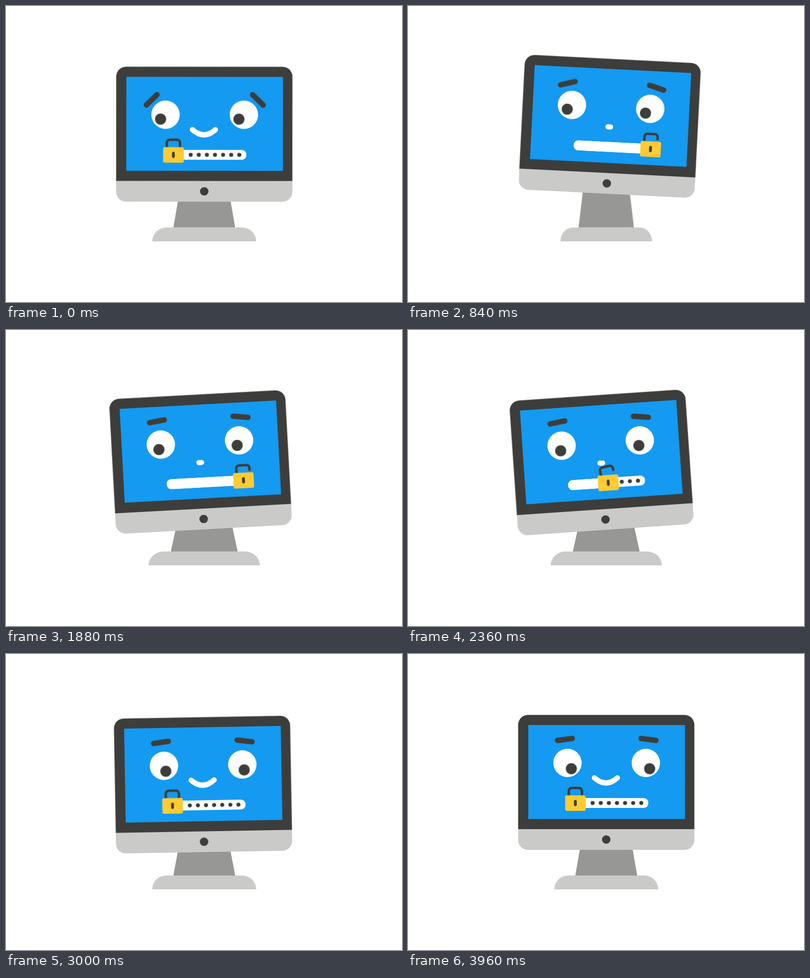
An HTML page that plays this animation: 800 px wide and 600 px high, repeating every 4000 ms.

```html
<!DOCTYPE html>
<html lang="en">
<head>
<meta charset="utf-8">
<title>Worried computer</title>
<style>
  html, body { margin: 0; width: 100%; height: 100%; overflow: hidden; background: #fff; }
  svg { display: block; width: 100vw; height: 100vh; }

  .dark { fill: #3d3d3b; }
  .silver { fill: #cacac9; }
  .blue { fill: #149af0; }
  .white { fill: #fff; }
  .line { fill: none; stroke-linecap: round; }

  .anim { animation: 4s ease-in-out infinite; }
  .head { animation-name: hop; transform-origin: 400.5px 398px; }
  .stand { animation-name: stretch; transform-origin: 400.5px 449px; }
  .base { animation-name: spread; transform-origin: 400.5px 449px; }
  .brow { animation-name: brow; stroke: #3d3d3b; stroke-width: 11; }
  .pupil { animation-name: look; }
  .lid { animation-name: blink; }
  .smile { animation-name: smile; stroke: #fff; stroke-width: 10.5; }
  .slide { animation-name: slide; }
  .swing { animation-name: swing; }
  .shackle { animation-name: unlock; stroke: #3d3d3b; stroke-width: 5; }

  @keyframes hop {
    0% { transform: translateY(0) rotate(0deg); animation-timing-function: ease-out; }
    4% { transform: translateY(-33px) rotate(2.9deg); }
    10% { transform: translateY(-14.5px) rotate(2.9deg); }
    15%, 36% { transform: translateY(-16.5px) rotate(2.9deg); }
    39% { transform: translateY(-29px) rotate(4.1deg); animation-timing-function: ease-in; }
    42% { transform: translateY(-8px) rotate(0deg); animation-timing-function: ease-out; }
    47% { transform: translateY(7px) rotate(-3.08deg); animation-timing-function: ease-out; }
    51%, 64% { transform: translateY(8px) rotate(-3.9deg); }
    67% { transform: translateY(10px) rotate(-4.95deg); animation-timing-function: ease-in; }
    70% { transform: translateY(-23.4px) rotate(1.7deg); animation-timing-function: ease-out; }
    71% { transform: translateY(-33px) rotate(2.9deg); }
    75% { transform: translateY(4.5px) rotate(-1deg); }
    82%, 100% { transform: translateY(0) rotate(0deg); }
  }
  @keyframes stretch {
    0% { transform: scale(1, 1); animation-timing-function: ease-out; }
    4% { transform: scale(.87, 1.635); }
    10% { transform: scale(.895, 1.28); }
    15%, 36% { transform: scale(.895, 1.317); }
    39% { transform: scale(.87, 1.56); animation-timing-function: ease-in; }
    42% { transform: scale(1, 1.15); animation-timing-function: ease-out; }
    47% { transform: scale(1.08, .865); animation-timing-function: ease-out; }
    51%, 64% { transform: scale(1.08, .846); }
    67% { transform: scale(1.09, .81); animation-timing-function: ease-in; }
    70% { transform: scale(.92, 1.45); animation-timing-function: ease-out; }
    71% { transform: scale(.88, 1.635); }
    75% { transform: scale(1, .913); }
    82%, 100% { transform: scale(1, 1); }
  }
  @keyframes spread {
    0% { transform: scaleX(1); animation-timing-function: ease-out; }
    4% { transform: scaleX(.86); }
    10%, 36% { transform: scaleX(.88); }
    39% { transform: scaleX(.86); animation-timing-function: ease-in; }
    42% { transform: scaleX(1); animation-timing-function: ease-out; }
    47%, 64% { transform: scaleX(1.07); }
    67% { transform: scaleX(1.08); animation-timing-function: ease-in; }
    70% { transform: scaleX(.92); animation-timing-function: ease-out; }
    71% { transform: scaleX(.87); }
    75%, 100% { transform: scaleX(1); }
  }
  @keyframes brow {
    0% { transform: translate(293px, 191.5px) rotate(-46.3deg); }
    8%, 30% { transform: translate(317px, 173.2px) rotate(-7.6deg); }
    35%, 37% { transform: translate(317px, 180.4px) rotate(-7.6deg); }
    43%, 66% { transform: translate(317px, 173.2px) rotate(-7.6deg); }
    73%, 100% { transform: translate(292.6px, 184px) rotate(-46.3deg); }
  }
  @keyframes look {
    0%, 4% { transform: translate(-10px, 9px); }
    10% { transform: translate(-2.5px, 10.3px); animation-timing-function: ease-out; }
    16%, 53% { transform: translate(7.8px, 11.8px); animation-timing-function: ease-in; }
    59% { transform: translate(-1.2px, 10.4px); animation-timing-function: ease-out; }
    65%, 100% { transform: translate(-10px, 9px); }
  }
  @keyframes blink {
    0%, 72.5% { transform: translateY(-32px); animation-timing-function: linear; }
    75% { transform: translateY(0); animation-timing-function: ease-out; }
    77.5% { transform: translateY(42px); }
    82%, 100% { transform: translateY(-32px); }
  }
  @keyframes smile {
    0%, 11% { stroke-dasharray: 100 200; stroke-dashoffset: 0; }
    17%, 66% { stroke-dasharray: 10 200; stroke-dashoffset: -45; }
    72%, 100% { stroke-dasharray: 100 200; stroke-dashoffset: 0; }
  }
  @keyframes slide {
    0%, 4% { transform: translateX(0); }
    16%, 53% { transform: translateX(147px); }
    65%, 100% { transform: translateX(0); }
  }
  @keyframes swing {
    0%, 2% { transform: rotate(0deg); }
    6%, 11% { transform: rotate(-10deg); }
    17%, 53% { transform: rotate(0deg); }
    57%, 61% { transform: rotate(-10deg); }
    66%, 100% { transform: rotate(0deg); }
  }
  @keyframes unlock {
    0%, 1% { stroke-dasharray: 57 99; }
    4%, 64% { stroke-dasharray: 48.3 99; }
    67%, 100% { stroke-dasharray: 57 99; }
  }
</style>
</head>
<body>
<svg viewBox="0 0 800 600">
  <defs>
    <clipPath id="eyeClip"><circle r="30"/></clipPath>
    <clipPath id="barClip"><rect x="330" y="292" width="155.5" height="20" rx="9"/></clipPath>
    <g id="eye" clip-path="url(#eyeClip)">
      <circle class="white" r="28.7"/>
      <circle class="anim pupil dark" r="11.2"/>
      <path class="anim lid blue" d="M-31-100V-5Q0-20 31-5V-100Z"/>
    </g>
    <path id="brow" class="anim brow line" d="M-15 0H15"/>
  </defs>

  <path class="anim stand" fill="#979795" d="M338 449L348 391H453L463 449Z"/>
  <path class="anim base silver" d="M295.5 477a28 28 0 0 1 28-28H477.5a28 28 0 0 1 28 28Z"/>

  <g class="anim head">
    <path class="dark" d="M222.5 356V143.5a20 20 0 0 1 20-20H558.5a20 20 0 0 1 20 20V356Z"/>
    <path class="silver" d="M222.5 355V377a20 20 0 0 0 20 20H558.5a20 20 0 0 0 20-20V355Z"/>
    <rect class="blue" x="243" y="144" width="316.5" height="190.5"/>
    <circle class="dark" cx="400.5" cy="376" r="8.6"/>

    <use href="#eye" x="322.2" y="220.7"/>
    <use href="#eye" x="480.5" y="220.7"/>
    <use href="#brow"/>
    <use href="#brow" transform="matrix(-1 0 0 1 803 0)"/>
    <path class="anim smile line" pathLength="100" d="M376.5 251Q400 272 423 251"/>

    <g clip-path="url(#barClip)">
      <rect class="white" x="330" y="292" width="156" height="20"/>
      <path class="line" stroke="#3d3d3b" stroke-width="8.2" stroke-dasharray="0 16.38" d="M373 302H472"/>
      <rect class="anim slide white" x="178" y="292" width="160" height="20"/>
    </g>
    <g class="anim slide">
      <g transform="translate(324.8 287)">
        <g class="anim swing">
          <path class="anim shackle line" d="M0 2V-9.5a6 6 0 0 1 6-6H20.6a6 6 0 0 1 6 6V2"/>
        </g>
      </g>
      <rect x="317.5" y="286.5" width="41.5" height="31.5" rx="3.5" fill="#ffcb33"/>
      <rect class="dark" x="335.3" y="295.8" width="5.6" height="12.6" rx="2.8"/>
    </g>
  </g>
</svg>
</body>
</html>
```
